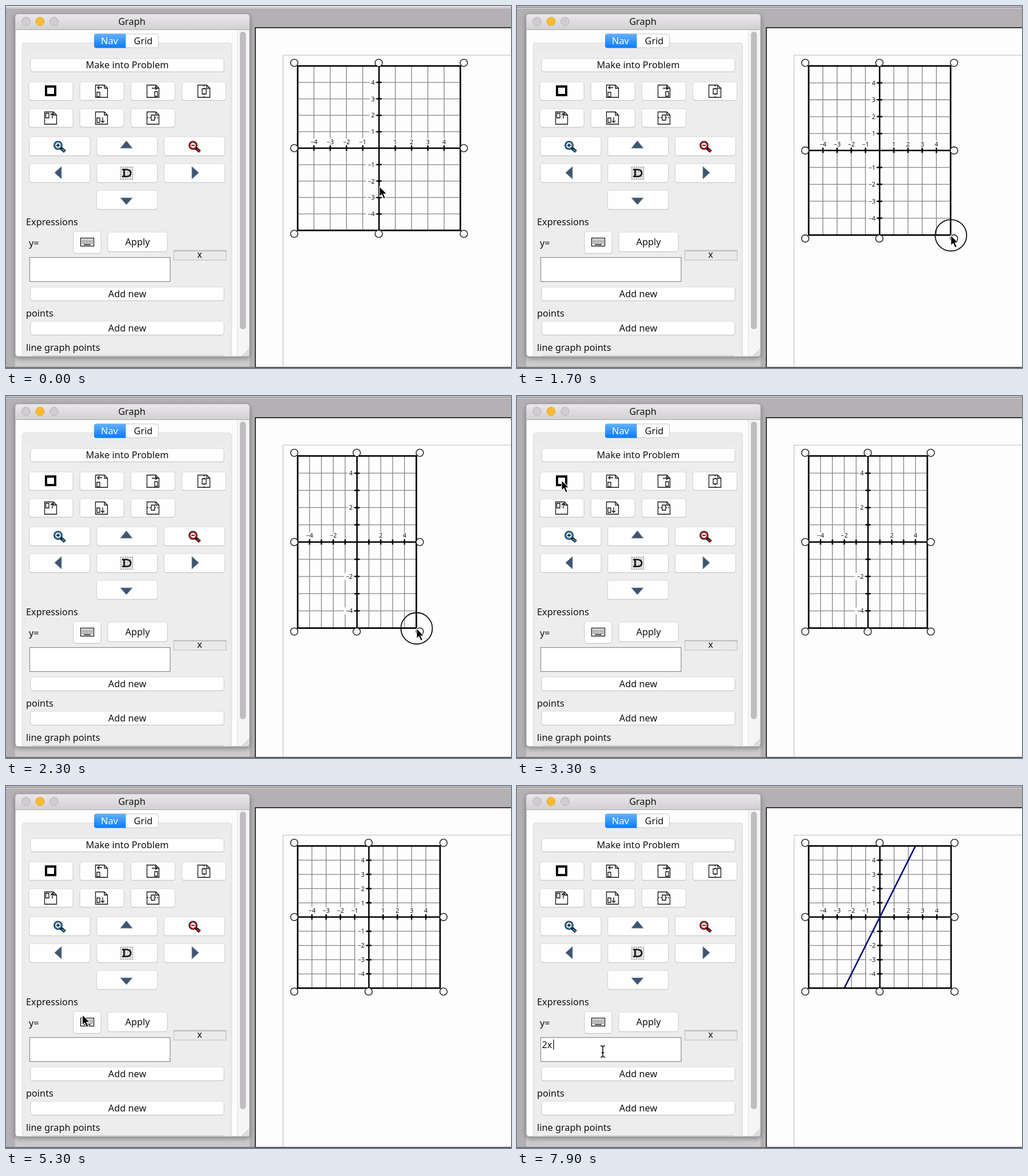
Recreate the animation shown at these times as an HTML page. Size 883 by 634 pixels, loop 8 s.

```html
<!DOCTYPE html>
<html lang="en">
<head>
<meta charset="utf-8">
<title>Graph tool</title>
<style>
  html, body { margin: 0; width: 100%; height: 100%; overflow: hidden; background: #b3b1b3; }
  svg { display: block; width: 883px; height: 634px; }
  text { font: 16.3px "Noto Sans", "Open Sans", sans-serif; fill: #111; }
  .num { font-size: 10.8px; }
  .mid { text-anchor: middle; }
  .icon { fill: none; stroke: #111; stroke-width: 1.3; }
</style>
</head>
<body>
<svg id="stage" viewBox="0 0 883 634" xmlns="http://www.w3.org/2000/svg"></svg>
<script>
const LOOP = 8000, STEP = 100;
const LEFT = 510, TOP = 105;
const PRESS = 1200, RELEASE = 2400, SQUARE = 3500, FOCUS = 5700;
const TYPE_2 = 6800, TYPE_X = 7100, PLOT = 7500;

// Pointer stops: time, x, y
const PATH = [
  [0, 653, 316], [200, 685, 330], [400, 775, 366], [600, 837, 396], [800, 818, 403],
  [1000, 802, 402], [1300, 801, 402], [1500, 786, 401], [1800, 745, 402], [1900, 731, 403],
  [2100, 722, 405], [2300, 718, 407], [2400, 717, 407], [2600, 610, 362], [2900, 290, 225],
  [3200, 90, 152], [3400, 66, 143], [4500, 66, 143], [4800, 82, 220], [5100, 115, 338],
  [5400, 143, 432], [5600, 150, 460], [8000, 150, 460]
];

function rect(x, y, w, h, fill, extra = '') {
  return `<rect x="${x}" y="${y}" width="${w}" height="${h}" fill="${fill}" ${extra}/>`;
}
function line(x1, y1, x2, y2, color, width = 1) {
  return `<path d="M${x1} ${y1}L${x2} ${y2}" stroke="${color}" stroke-width="${width}"/>`;
}
function text(x, y, value, cls = '') {
  return `<text x="${x}" y="${y}" class="${cls}">${value}</text>`;
}
function circle(x, y, r, fill, stroke, width = 1) {
  return `<circle cx="${x}" cy="${y}" r="${r}" fill="${fill}" stroke="${stroke}" stroke-width="${width}"/>`;
}
function button(x, y, w, h, label = '') {
  return rect(x - .5, y + 1, w + 1, h, '#c6c4c6', 'rx="4.5"') +
    rect(x, y, w, h, '#fefefe', 'rx="4" stroke="#d3d1d3" stroke-width=".8"') +
    text(x + w / 2, y + h / 2 + 5.5, label, 'mid');
}

// Page with a folded corner; marks are drawn in page coordinates
function pageIcon(x, y, marks, dashes = '') {
  return `<g class="icon" transform="translate(${x} ${y})">
    <path d="M.5 .5H16L21.5 6V22H.5Z M16 .5V6H21.5"/>
    <path d="${marks}"/><path d="${dashes}" stroke-dasharray="2 2"/></g>`;
}

function lens(x, y, color, plus) {
  return `<g transform="translate(${x} ${y})" fill="none">
    <path d="M5 5L12 11" stroke="#111" stroke-width="5.5"/>
    <path d="M6.5 6.5L11.5 10.5" stroke="${color}" stroke-width="2.6"/>
    <circle r="7" fill="#fff" stroke="#111" stroke-width="1.6"/>
    <circle r="5.4" fill="#fff" stroke="${color}" stroke-width="2"/>
    <path d="M-3 0H3${plus ? 'M0 -3V3' : ''}" stroke="#222" stroke-width="1.8"/></g>`;
}

function gridIcon() {
  let d = '';
  for (let i = 0; i < 6; i++) d += `M199 ${283 + i * 4}H223M${201 + i * 4} 280V305`;
  return `<path d="${d}" stroke="#aaa" stroke-width="1"/>
    <path d="M203 286.5H211Q218 287 218 292.5Q218 298.500 211 298.500H203M206.500 286V299"
      fill="none" stroke="#111" stroke-width="2.6"/>`;
}

function keyboardIcon() {
  let keys = '';
  for (let row = 0; row < 3; row++)
    for (let i = 0; i < 8; i++) keys += `M${132.5 + i * 2.5} ${410 + row * 2.700}h1.300`;
  return rect(130.5, 406.5, 23, 14, '#fff', 'stroke="#111" stroke-width="1.3"') +
    `<path d="${keys}M136 418h12" stroke="#111" stroke-width="1.500"/>`;
}

function background() {
  return rect(0, 0, 883, 634, '#b3b1b3') +
    rect(436, 38, 450, 595, '#fdfdfd', 'stroke="#111" stroke-width="1.6"') +
    `<path d="M484.5 633V86H883" fill="none" stroke="#b9b9b9"/>` +
    line(0, 633, 883, 633, '#666', 1.4);
}

function panel() {
  const arrow = d => `<path d="${d}Z" fill="#3f5572" stroke="#7f93a8" stroke-width=".8"/>`;
  let s = rect(16, 614, 410, 18, '#cccacc') +
    rect(16, 14, 410, 600, '#fdfdfd', 'rx="5" stroke="#908e90" filter="url(#shadow)"') +
    `<path d="M16.500 41V19Q16.500 14.500 21 14.500H421Q425.500 14.500 425.500 19V41Z" fill="url(#bar)"/>` +
    line(16, 41.5, 426, 41.5, '#a9a7a9') +
    circle(35, 27, 7.3, '#cfcdcf', '#b5b3b5') + circle(59.5, 27, 7.3, '#fdbb2d', '#e0a030') +
    circle(84, 27, 7.3, '#cfcdcf', '#b5b3b5') + text(220, 33, 'Graph', 'mid');

  s += `<path d="M28.500 613V69Q28.500 64.500 33 64.500H390Q394.500 64.500 394.500 69V613Z" fill="#ecebec" stroke="#dedcde"/>` +
    rect(33, 84, 356, 529, '#eeedee') +
    rect(404, 42, 21, 571, '#f6f5f6') + line(404.5, 42, 404.5, 613, '#e2e2e2') +
    rect(409, 45, 10.5, 521, '#bfbdbf', 'rx="5"') +
    `<path d="M413 613L425 601M417 613L425 605M421 613L425 609" stroke="#999"/>`;

  s += rect(154.5, 49, 112, 24, '#fff', 'rx="4" stroke="#c8c6c8"') +
    `<path d="M209.500 48.500V73.500H158Q154 73.500 154 69.500V52.500Q154 48.500 158 48.500Z" fill="url(#blue)"/>` +
    `<text x="181" y="67" class="mid" style="fill:#fff">Nav</text>` + text(240, 67, 'Grid', 'mid');

  s += button(43, 92, 338, 23, 'Make into Problem');
  for (let i = 0; i < 4; i++) s += button(40 + i * 89.2, 133, 77, 32);
  for (let i = 0; i < 3; i++) s += button(40 + i * 89.2, 180, 77, 32) +
    button(41 + i * 117.7, 229, 106, 33) + button(41 + i * 117.7, 276, 106, 33);
  s += button(158.5, 323, 106, 33);

  s += rect(70, 141, 16, 15, '#fff', 'stroke="#000" stroke-width="4"') +
    pageIcon(156, 138, 'M3 13H8V21H3ZM12 5H4M7 2L4 5L7 8') +
    pageIcon(246, 138, 'M14 12H19V20H14ZM9 6H18M15 3L18 6L15 9') +
    pageIcon(335, 138, 'M8 7H15V16H8Z', 'M11.500 1V7M11.500 16V22') +
    pageIcon(67, 185, 'M2.500 3H8V11H2.500ZM14 12V3M11 6L14 3L17 6') +
    pageIcon(156, 185, 'M3 11H8V19H3ZM13 10V19M10 16L13 19L16 16') +
    pageIcon(246, 185, 'M8 6H14V15H8Z', 'M1 10.500H8M14 10.500H22') +
    lens(91, 244, '#2d8fd5', true) + lens(327, 244, '#cf1b1b', false) + gridIcon() +
    arrow('M200 249L210.500 236L221 249') + arrow('M200 336L210.500 348L221 336') +
    arrow('M97 281L85 292L97 303') + arrow('M325 281L337 292L325 303');

  s += text(35, 384, 'Expressions') + text(40, 421, 'y=') +
    button(118, 395, 48, 38) + keyboardIcon() + button(178, 396, 104, 34, 'Apply') +
    rect(293.5, 428, 91.500, 17, '#ebeaeb', 'stroke="#bbb"') + line(294, 429, 385, 429, '#aaa') +
    text(338.500, 441, 'x', 'mid') +
    rect(41.5, 440.5, 245.500, 42, '#fff', 'stroke="#8c8a8c" stroke-width="1.2"') +
    button(43, 492, 338, 24, 'Add new') + text(35, 544, 'points') +
    button(43, 552, 338, 24, 'Add new') + text(35, 604, 'line graph points') +
    line(45, 612.5, 380, 612.5, '#c9c7c9');
  return s;
}

function pointerAt(t) {
  const i = PATH.findIndex(p => p[0] > t);
  const [t0, x0, y0] = PATH[i - 1], [t1, x1, y1] = PATH[i];
  const k = (t - t0) / (t1 - t0);
  return { x: x0 + (x1 - x0) * k, y: y0 + (y1 - y0) * k };
}

function graphSize(t) {
  if (t <= PRESS) return { w: 284.5, h: 288 };
  if (t >= SQUARE) return { w: 249, h: 249 };
  const p = pointerAt(Math.min(t, RELEASE - STEP));
  return { w: p.x - LEFT - .5, h: p.y - TOP - .5 };
}

function graph(t) {
  const { w, h } = graphSize(t);
  const ux = w / 10, uy = h / 10, ox = LEFT + w / 2, oy = TOP + h / 2;
  const right = LEFT + w, bottom = TOP + h, every = ux < 21.5 ? 2 : 1;
  let grid = '', labels = '', ticks = '', handles = '';
  for (let n = -4; n <= 4; n++) {
    if (!n) continue;
    const x = ox + n * ux, y = oy - n * uy;
    grid += `M${x} ${TOP}V${bottom}M${LEFT} ${y}H${right}`;
    ticks += `M${x} ${oy - 4.5}v9M${ox - 4.5} ${y}h9`;
    if (n % every) continue;
    const name = n < 0 ? '\u2212' + -n : n, wide = n < 0 ? 13 : 6.5;
    labels += rect(x - wide / 2 - 1, oy - 17, wide + 2, 11, '#fdfdfd') +
      rect(ox - 10 - wide, y - 6, wide + 3, 12, '#fdfdfd') +
      text(x, oy - 7.5, name, 'num mid') +
      `<text x="${ox - 7.5}" y="${y + 4}" class="num" text-anchor="end">${name}</text>`;
  }
  const xs = [LEFT - 6, ox - .5, right + 6], ys = [TOP - 5.5, oy, bottom + 6];
  xs.forEach((x, i) => ys.forEach((y, j) => {
    if (i !== 1 || j !== 1) handles += circle(x, y, 6.4, '#fff', '#111', 1.4);
  }));
  return `<path d="${grid}" stroke="#858585" stroke-width="1.3"/>` + labels +
    `<path d="M${LEFT} ${oy}H${right}M${ox} ${TOP}V${bottom}${ticks}" stroke="#000" stroke-width="2.5"/>` +
    (t >= PLOT ? line(ox - 2.5 * ux, bottom, ox + 2.5 * ux, TOP, '#080878', 2.6) : '') +
    rect(LEFT, TOP, w, h, 'none', 'stroke="#000" stroke-width="2.7"') + handles;
}

function entry(t) {
  const value = t >= TYPE_X ? '2x' : t >= TYPE_2 ? '2' : '';
  const since = t >= PLOT ? PLOT : t >= TYPE_X ? TYPE_X : t >= TYPE_2 ? TYPE_2 : t >= FOCUS ? FOCUS : RELEASE;
  const caret = t >= RELEASE && (t - since) % 1000 < 500;
  const x = 43.5 + [0, 10, 20.5][value.length];
  return text(43.5, 458.500, value) + (caret ? line(x, 444, x, 462, '#000', 1.2) : '');
}

function pointer(t) {
  const { x, y } = pointerAt(t);
  const between = (a, b) => t >= a && t < b;
  const down = between(PRESS, RELEASE) || between(SQUARE - STEP, SQUARE + STEP) || between(FOCUS, FOCUS + 200);
  const inField = x > 41 && x < 287 && y > 440 && y < 483;
  const shape = inField
    ? '<path d="M-4 -5Q0 -5 0 -2V12Q0 15 -4 15M4 -5Q0 -5 0 -2M0 12Q0 15 4 15M-2.500 7H2.500" fill="none" stroke="#111" stroke-width="1.6"/>'
    : '<path d="M0 0V18L4 14.300L7.200 21.500L10.400 20.200L7.300 13H13Z" fill="#000" stroke="#fff" stroke-width="1.1"/>';
  return (down ? circle(x, y, 27.5, 'none', '#111', 1.8) : '') +
    `<g transform="translate(${x} ${y})">${shape}</g>`;
}

function topEdge(t) {
  return rect(0, 0, 883, 4, '#e6e5e6') +
    (t < PRESS ? line(0, 2.5, 883, 2.5, '#b8b6b8') : line(0, 2, 883, 2, '#777577', 1.6));
}

const stage = document.getElementById('stage');
stage.innerHTML = `<defs>
  <linearGradient id="bar" x2="0" y2="1"><stop stop-color="#e9e7e9"/><stop offset="1" stop-color="#d2d0d2"/></linearGradient>
  <linearGradient id="blue" x2="0" y2="1"><stop stop-color="#65b1fa"/><stop offset="1" stop-color="#087bfb"/></linearGradient>
  <filter id="shadow" x="-10%" y="-10%" width="120%" height="120%"><feDropShadow dx="0" dy="3" stdDeviation="4" flood-opacity=".35"/></filter>
  </defs>${background()}${panel()}<g id="live"></g>`;
const live = document.getElementById('live');
let shown = -1;

function render(t) {
  live.innerHTML = topEdge(t) + graph(t) + entry(t) + pointer(t);
}

const start = performance.now();
function tick() {
  const t = Math.floor((performance.now() - start) % LOOP / STEP) * STEP;
  if (t !== shown) render(shown = t);
  requestAnimationFrame(tick);
}
tick();
</script>
</body>
</html>
```
